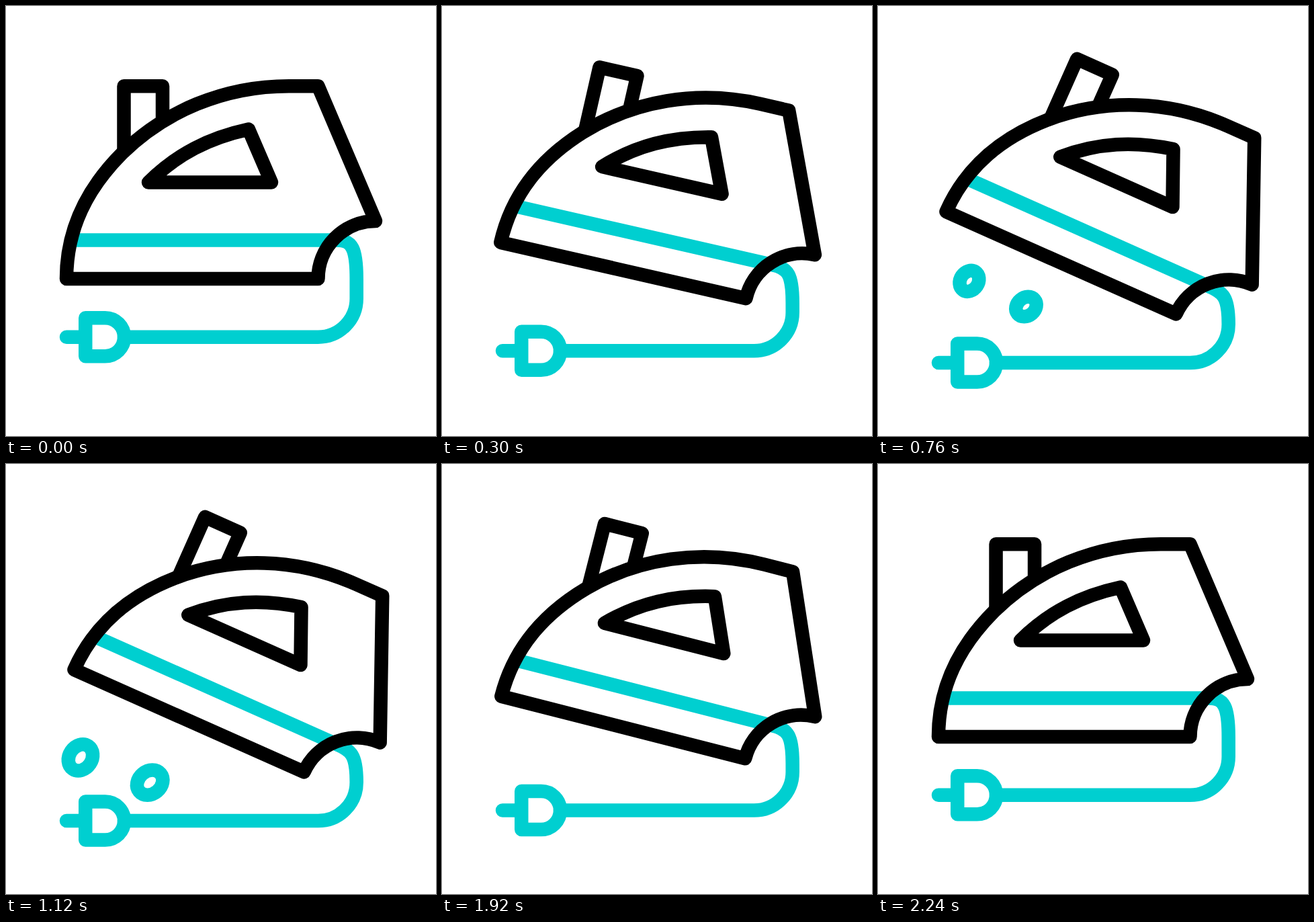
These frames come from a looping animation (640x640 px, 2400 ms). An HTML page:

```html
<!DOCTYPE html>
<html lang="en">
<head>
<meta charset="utf-8">
<title>Iron</title>
<style>
  html, body { margin: 0; width: 100%; height: 100%; overflow: hidden; background: #fff; }
  svg { display: block; width: 100vw; height: 100vh; }
  path, ellipse { fill: none; stroke-width: 20.5; stroke-linecap: round; stroke-linejoin: round; }
  .cyan { stroke: #00cfd0; }
  .black { stroke: #000; }
</style>
</head>
<body>
<svg viewBox="0 0 640 640">
  <g class="cyan">
    <path id="cord"/>
    <path id="plug" d="M90 492.75H118M118.25 464.25H147.5A28.5 28.5 0 0 1 147.5 521.25H118.25Z"/>
    <ellipse class="drop"/>
    <ellipse class="drop"/>
  </g>
  <g id="iron">
    <path class="cyan" d="M104 348.5H493"/>
    <g class="black">
      <path d="M175.5 213V119.2H233V166"/>
      <path d="M90 406H464.5A86 86 0 0 1 550 320L464.5 119.2H421C324 119.2 236 157 173 219C121 271 90 331 90 406Z"/>
      <path d="M212 262.5H395L361 183.5C303 196 255 220 212 262.5Z"/>
    </g>
  </g>
</svg>
<script>
const LOOP = 2400;
const PIVOT = { x: 493, y: 348.5 };
const TILT = 24, SINK = 69, DROP = 38.3;
const STEAM = { from: 540, to: 1430 };
// x, y at 1120 ms; velocity per ms; slight bend; ellipse angle
const drops = [
  { x: 111, y: 436.8, vx: -.0694, vy: .0764, bx: 1.8e-5, by: 2e-5, angle: -56 },
  { x: 214.2, y: 474, vx: -.0175, vy: .0736, bx: 0, by: 3e-5, angle: -40 }
];

const find = id => document.getElementById(id);
const iron = find('iron'), cord = find('cord'), plug = find('plug');
const dropEls = document.querySelectorAll('.drop');

const smooth = (t, a, b) => {
  const x = Math.min(1, Math.max(0, (t - a) / (b - a)));
  return x * x * (3 - 2 * x);
};

function drawIron(k) {
  const angle = TILT * k, rad = angle * Math.PI / 180;
  const top = PIVOT.y + SINK * k, low = 492.75 + DROP * k;
  const bend = 406 + 67 * k;
  iron.setAttribute('transform',
    `translate(0 ${SINK * k}) rotate(${angle} ${PIVOT.x} ${PIVOT.y})`);
  plug.setAttribute('transform', `translate(0 ${DROP * k})`);
  cord.setAttribute('d',
    `M${PIVOT.x} ${top}` +
    `C${PIVOT.x + 22 * Math.cos(rad)} ${top + 22 * Math.sin(rad)} 521.7 ${bend - 45 + 4 * k} 521.7 ${bend}` +
    `V${low - 57.2}A57.2 57.2 0 0 1 464.5 ${low}H176`);
}

function drawDrop(el, d, t) {
  const on = t > STEAM.from && t < STEAM.to;
  el.style.display = on ? '' : 'none';
  if (!on) return;
  const size = Math.sin(Math.PI * (t - STEAM.from) / (STEAM.to - STEAM.from));
  const dt = t - 1120, q = dt * (dt + 360);
  const x = d.x + d.vx * dt + d.bx * q;
  const y = d.y + d.vy * dt + d.by * q;
  el.setAttribute('rx', 23.3 * size);
  el.setAttribute('ry', 19.1 * size);
  el.setAttribute('transform', `translate(${x} ${y}) rotate(${d.angle})`);
  el.style.strokeWidth = 20.5 * Math.min(1, 6 * size);
}

function frame() {
  const t = performance.now() % LOOP;
  drawIron(smooth(t, 0, 575) - smooth(t, 1668, 2249));
  drops.forEach((d, i) => drawDrop(dropEls[i], d, t));
  requestAnimationFrame(frame);
}
frame();
</script>
</body>
</html>
```
